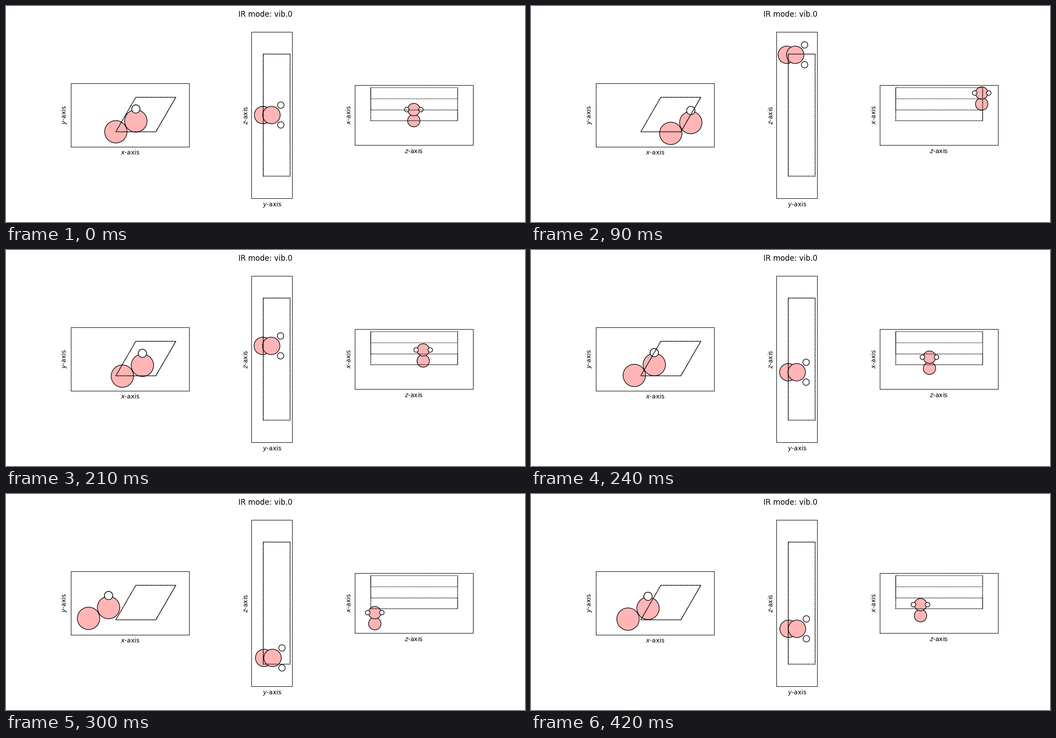
A matplotlib script for the animation above (450 ms loop, 1159x483 px).

```python
import numpy as np
import matplotlib.pyplot as plt
from matplotlib.animation import FuncAnimation
from matplotlib.patches import Circle, Polygon

W, H, DPI = 1159, 483, 100
FRAMES, INTERVAL = 15, 30

# Hexagonal cell and atoms, in angstrom
A = np.array([3.0, 0, 0])
B = np.array([1.5, 1.5 * np.sqrt(3), 0])
C = np.array([0, 0, 11.75])
MID = C[2] / 2
BORON, HYDROGEN = (0.84, "#ffb5b5"), (0.31, "white")
ATOMS = [
    (np.array([0, 0, MID]), BORON),
    (np.array([1.5, 0.81, MID]), BORON),
    (np.array([1.5, 1.71, MID - 0.954]), HYDROGEN),
    (np.array([1.5, 1.71, MID + 0.954]), HYDROGEN),
]
MODE = np.array([2.36, -0.125, 6.1])

# (horizontal axis, vertical axis, depth axis, xlim, ylim)
VIEWS = [
    (0, 1, 2, (-3.369, 5.497), (-1.124, 3.631)),
    (1, 2, 0, (-1.098, 2.821), (-2.136, 13.880)),
    (2, 0, 1, (-2.115, 13.897), (-3.321, 4.824)),
]


def cell_faces():
    origin = np.zeros(3)
    for u, v, w in ((A, B, C), (A, C, B), (B, C, A)):
        for start in (origin, w):
            yield np.array([start, start + u, start + u + v, start + v])


def draw_view(ax, h, v, depth, xlim, ylim):
    ax.set(xlim=xlim, ylim=ylim, xticks=[], yticks=[], aspect="equal",
           xlabel=f"${'xyz'[h]}$-axis", ylabel=f"${'xyz'[v]}$-axis")
    balls = []
    for pos, (radius, color) in sorted(ATOMS, key=lambda a: a[0][depth]):
        ball = Circle(pos[[h, v]], radius, fc=color, ec="black", lw=1)
        ax.add_patch(ball)
        balls.append((ball, pos, [h, v]))
    for face in cell_faces():
        ax.add_patch(Polygon(face[:, [h, v]], fill=False, ec="black",
                             ls=":", lw=1, zorder=2))
    return balls


plt.rcParams["font.family"] = "DejaVu Sans"
fig, axes = plt.subplots(1, 3, figsize=((W + 1e-6) / DPI, (H + 1e-6) / DPI),
                         dpi=DPI)
fig.suptitle("IR mode: vib.0")
balls = [b for ax, view in zip(axes, VIEWS) for b in draw_view(ax, *view)]


def update(i):
    shift = MODE * np.sin(2 * np.pi * i / FRAMES)
    for ball, pos, plane in balls:
        ball.center = (pos + shift)[plane]
    return [b[0] for b in balls]


anim = FuncAnimation(fig, update, frames=FRAMES, interval=INTERVAL,
                     repeat=True, repeat_delay=0, blit=False)
plt.show()
```
